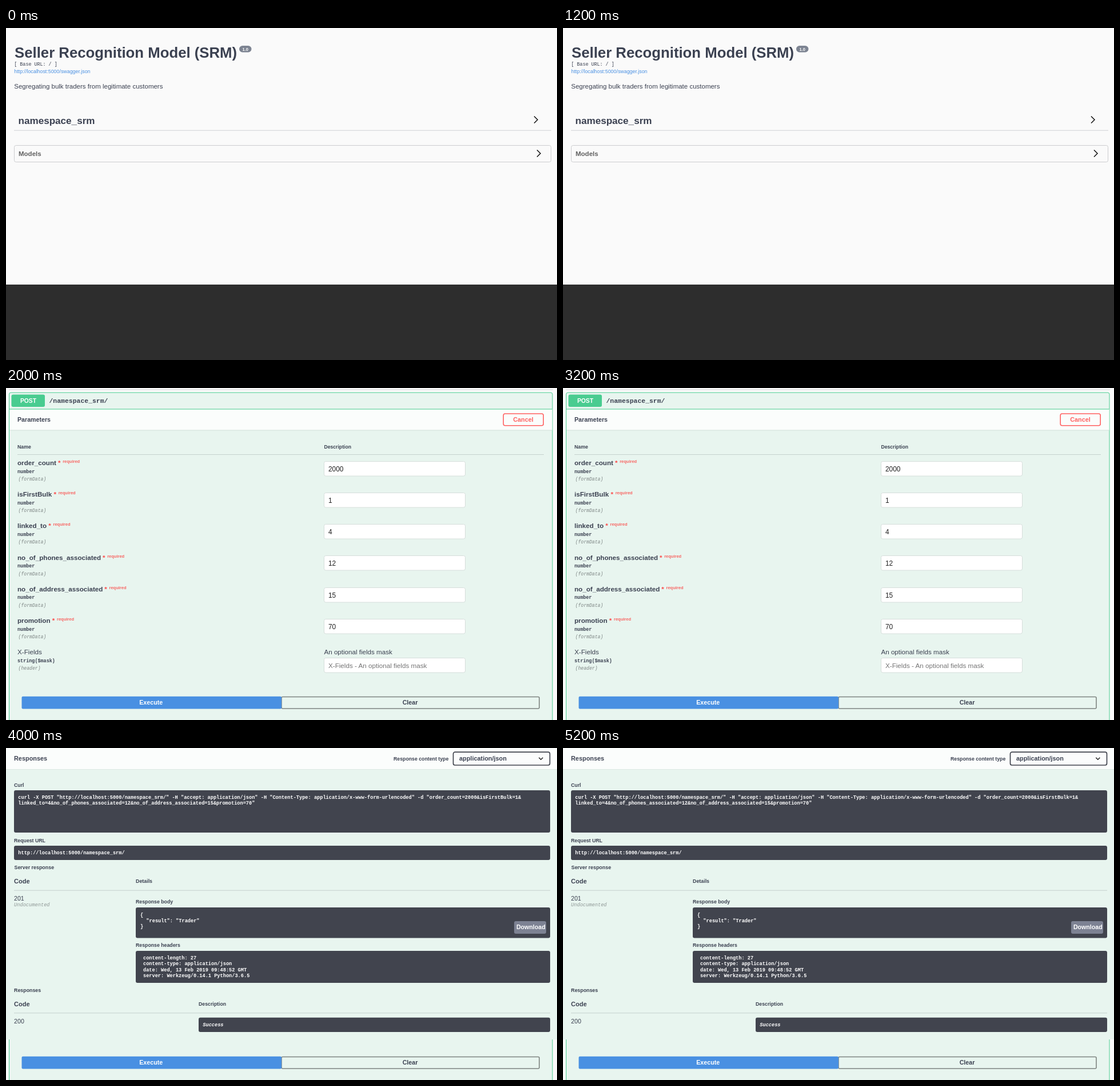
An HTML page for the animation above (6 s loop, 964 by 581 pixels).

```html
<!DOCTYPE html>
<html lang="en">
<head>
<meta charset="utf-8">
<title>API docs</title>
<style>
  html, body { margin: 0; width: 100%; height: 100%; overflow: hidden; background: #fafafa; }
  svg { display: block; width: 964px; height: 581px; }
  text { font-family: "Liberation Sans", Arial, sans-serif; fill: #3b4151; white-space: pre; }
  .b { font-weight: 700; }
  .m { font-family: "Liberation Mono", "Courier New", monospace; }
  .i { font-style: italic; }
  .c { text-anchor: middle; }
</style>
</head>
<body>
<svg id="stage" viewBox="0 0 964 581"></svg>
<script>
const NS = 'http://www.w3.org/2000/svg';
const INK = '#3b4151', GREEN = '#49cc90', MINT = '#e8f5ef', CODE = '#41444e', RULE = '#c5d1cd';
const LOOP = 6000;
const stage = document.getElementById('stage');
let layer;

function add(tag, attrs, parent = layer) {
  const el = document.createElementNS(NS, tag);
  for (const key in attrs) el.setAttribute(key, attrs[key]);
  return parent.appendChild(el);
}

function text(str, x, y, size, cls = '', fill = INK) {
  const el = add('text', { x, y, class: cls, 'font-size': size });
  el.style.fill = fill;
  el.textContent = str;
  return el;
}

// Boxes are given by their left, top, right and bottom edges.
function box(l, t, r, b, fill, rx = 0, stroke = 'none', line = 1) {
  return add('rect', { x: l, y: t, width: r - l, height: b - t, rx, fill, stroke, 'stroke-width': line });
}

const path = (d, stroke, width) =>
  add('path', { d, fill: 'none', stroke, 'stroke-width': width });

const rule = (y, l, r, color = RULE) => box(l, y, r, y + 1, color);
const chevron = (x, y) => path(`M${x} ${y}l6 6l-6 6`, '#111', 1.5);
const label = (str, x, y, size = 8.75) => text(str, x, y, size, 'b');

function scene(start, draw) {
  layer = add('g', {}, stage);
  draw();
  if (!start) return;
  const offset = start / LOOP;
  layer.animate([
    { opacity: 0, offset: 0 }, { opacity: 0, offset },
    { opacity: 1, offset }, { opacity: 1, offset: 1 }
  ], { duration: LOOP, iterations: Infinity });
}

function overview() {
  box(0, 0, 964, 581, '#fafafa');
  text('Seller Recognition Model (SRM)', 15, 51.5, 25.75, 'b');
  box(408, 31, 429.5, 42.5, '#7d8492', 5.75);
  text('1.0', 418.8, 39.5, 7.5, 'b c', '#fff');
  text('[ Base URL: / ]', 14.3, 65.5, 8.4, 'm');
  text('http://localhost:5000/swagger.json', 14.3, 79, 8.86, '', '#4990e2');
  text('Segregating bulk traders from legitimate customers', 14.3, 106, 11.5);
  text('namespace_srm', 21.5, 168, 17.1, 'b');
  chevron(924, 154.5);
  rule(178.7, 14, 954, '#cfd1d4');
  box(14.5, 205.5, 953.5, 234.5, 'none', 3, '#cccdcf');
  text('Models', 22, 223.7, 11.5, 'b', '#606060');
  chevron(929, 213.5);
  box(0, 449, 964, 581, '#2d2d2d');
}

function input(y, value, color = '#222') {
  box(556.5, y + .5, 803.5, y + 26, '#fff', 3, '#d6dedb');
  text(value, 564, y + 17.5, 11.9, '', color);
}

function type(name, place, y) {
  text(name, 20, y + 13.5, 8.45, 'm b');
  text(place, 21.5, y + 27, 8.15, 'm i', '#7d8584');
}

function form() {
  const fields = [
    ['order_count', 2000, 91], ['isFirstBulk', 1, 83.5], ['linked_to', 4, 74.3],
    ['no_of_phones_associated', 12, 169], ['no_of_address_associated', 15, 172.3], ['promotion', 70, 80.8]
  ];
  box(0, 0, 964, 581, '#fafafa');
  rule(2.5, 5, 957, '#d3d5d7');
  box(5.5, 8, 956, 600, MINT, 3, GREEN);
  box(9.5, 11.5, 68, 33, GREEN, 3);
  text('POST', 39, 26, 10.3, 'b c', '#fff');
  text('/namespace_srm/', 75.5, 25.5, 11.45, 'm b');
  box(6, 37, 955.5, 73.5, '#fbfdfc');
  rule(36.5, 6, 955.5, GREEN);
  rule(73.5, 6, 955.5, '#d5e1dc');
  label('Parameters', 20, 59, 10.65);
  box(870.2, 45, 940.2, 65.8, 'none', 3, '#ff6060', 1.6);
  text('Cancel', 905, 59, 10.8, 'b c', '#ff6060');

  label('Name', 20, 105.5);
  label('Description', 556.5, 105.5, 8.65);
  rule(116, 20, 941);
  fields.forEach(([name, value, star], i) => {
    const y = 135 + i * 55.2;
    label(name, 20, y, 11.65);
    text('*', star, y, 11.6, 'b', '#fb4a49');
    text('required', star + 8.2, y - 4, 7.5, 'b', '#f86562');
    type('number', '(formData)', y);
    input(Math.round(y - 7.3), value);
  });
  text('X-Fields', 20, 466, 11.7);
  type('string($mask)', '(header)', 466.3);
  text('An optional fields mask', 556.5, 466, 11.6);
  input(472, '', '#757575');
  text('X-Fields - An optional fields mask', 564, 489.7, 11.66, '', '#757575');

  box(482, 540.5, 933, 561, 'none', 2, '#7e8481', 1.6);
  box(27.5, 539.7, 482, 561.5, '#4990e2', 2);
  text('Execute', 253.7, 554.3, 10.7, 'b c', '#fff');
  text('Clear', 707, 554.3, 10.7, 'b c');
}

function code(l, t, b, x, y, lines, cls = 'm b') {
  box(l, t, 952, b, CODE, 3);
  lines.forEach((line, i) => text(line, x, y + i * 10.35, 8.64, cls, '#fff'));
}

function result() {
  box(0, 0, 964, 510, MINT);
  box(0, 0, 964, 37, '#fbfdfc');
  rule(37, 0, 964, '#dce8e3');
  label('Responses', 14, 22, 10.9);
  label('Response content type', 678, 21.7);
  box(782.5, 7.2, 951.5, 30, '#fbfcfc', 3, CODE, 1.7);
  label('application/json', 793, 22.2, 10.9);
  path('M932.3 16.8l3.5 3.5l3.5-3.5', '#222', 1.5);

  label('Curl', 14, 68);
  code(14, 74, 148, 21.3, 89, [
    'curl -X POST "http://localhost:5000/namespace_srm/" -H "accept: application/json" -H "Content-Type: application/x-www-form-urlencoded" -d "order_count=2000&isFirstBulk=1&',
    'linked_to=4&no_of_phones_associated=12&no_of_address_associated=15&promotion=70"'
  ]);
  label('Request URL', 14, 164.5);
  code(14, 171, 196, 21.3, 186, ['http://localhost:5000/namespace_srm/']);
  label('Server response', 14.5, 212, 8.9);
  label('Code', 14, 237, 11);
  label('Details', 227, 236, 8.85);
  rule(248.7, 14, 952);
  text('201', 14, 267, 10.6);
  text('Undocumented', 14, 276.7, 8.7, 'm i', '#8f9896');

  label('Response body', 227, 272.3);
  code(227, 279, 332.5, 235, 294.5, ['{', '  "result": "Trader"', '}']);
  box(889, 303, 945, 325, '#7d8293', 3);
  text('Download', 918.3, 316.5, 10.65, 'b c', '#fff');
  label('Response headers', 227, 348);
  code(227, 355, 411, 234.8, 370, [
    ' content-length: 27',
    ' content-type: application/json',
    ' date: Wed, 13 Feb 2019 09:48:52 GMT',
    ' server: Werkzeug/0.14.1 Python/3.6.5'
  ]);

  label('Responses', 14, 426.5, 8.85);
  label('Code', 14, 452, 11);
  label('Description', 337, 451);
  rule(463.3, 14, 952);
  text('200', 14, 481.7, 10.7);
  code(337, 471.7, 497, 344.3, 486.7, ['Success'], 'm b i');
}

scene(0, overview);
scene(2000, form);
scene(4000, result);
</script>
</body>
</html>
```
